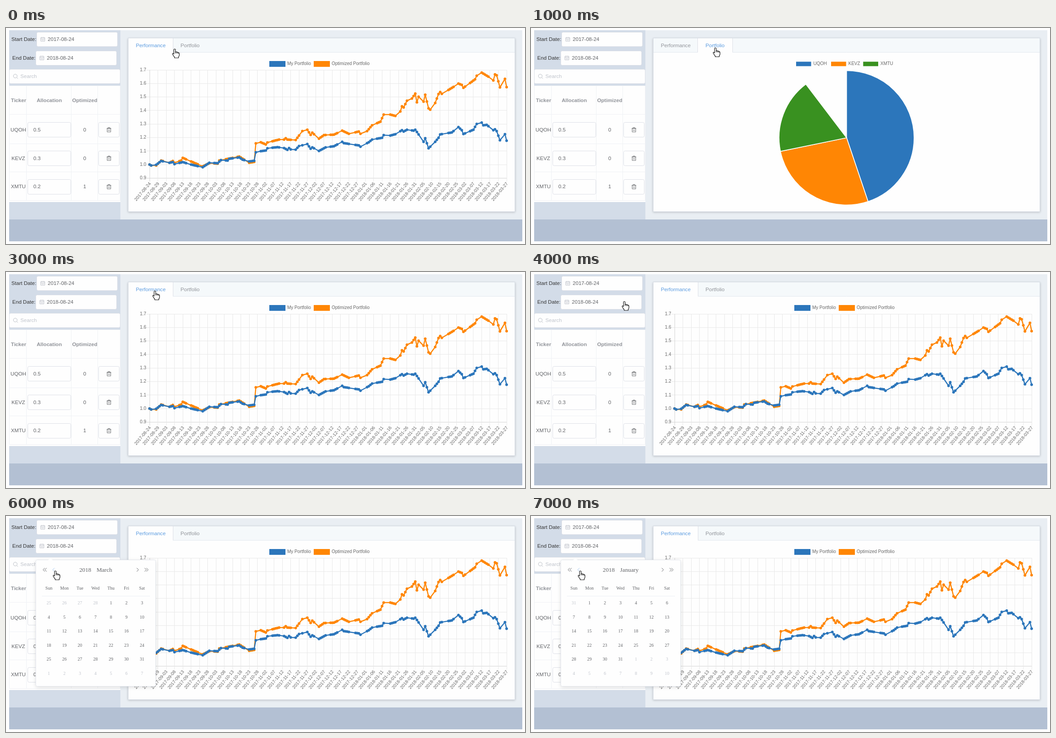
Write an HTML page with a canvas that moves like this. It is 1157x484 px and loops after 8000 ms.

```html
<!DOCTYPE html>
<html lang="en">
<head>
<meta charset="utf-8">
<title>Portfolio dashboard</title>
<style>
  html, body { margin: 0; width: 100%; height: 100%; overflow: hidden; background: #fefefe; }
  canvas { display: block; width: 1157px; height: 484px; }
</style>
</head>
<body>
<canvas id="stage"></canvas>
<script>
const W = 1157, H = 484, STEP = 1000, LOOP = 8000, DAY = 864e5;
const SANS = '"Liberation Sans", Arial, sans-serif';
const SERIF = '"Liberation Serif", "Times New Roman", serif';
const BLUE = '#2c76bb', ORANGE = '#ff8604', GREEN = '#399120';
const WHITE = '#fefefe', INK = '#606266', PALE = '#c0c4cc', LINE = '#dcdfe6', ACTIVE = '#5a9be0';

const assets = [
  { ticker: 'UQOH', share: 0.5, best: 0, color: BLUE },
  { ticker: 'KEVZ', share: 0.3, best: 0, color: ORANGE },
  { ticker: 'XMTU', share: 0.2, best: 1, color: GREEN }
];

// Turning points of each curve: day, y
const optimized = [
  0, 306, 1, 308, 4, 308, 7, 297, 12, 302, 14, 298, 15, 302, 19, 297, 20, 291, 25, 299,
  32, 310, 36, 303, 41, 304, 42, 297, 54, 288, 60, 302, 63, 300, 64, 258.5, 67, 256,
  70, 261, 71, 256.5, 78, 250, 81, 250, 82, 247, 83, 250, 88, 251, 92, 231, 95, 228,
  97, 239.5, 98, 234.5, 102, 248, 105, 240, 111, 239, 116, 230, 120, 237, 126, 232,
  127, 237, 131, 231, 134, 218, 139, 210, 141, 194, 145, 194, 148, 197, 151, 187,
  152, 175.5, 153, 178, 155, 163, 158, 158, 160, 147, 161, 166.5, 162, 154, 165, 165,
  166, 149.5, 168, 180, 169, 183, 172, 168, 174, 148, 175, 143.5, 176, 147.5, 183, 132,
  186, 124.5, 188, 127.5, 189, 134, 196, 115, 197, 107, 200, 100, 204, 109, 207, 117.5,
  208, 104, 209, 106, 211, 133, 214, 114, 215, 132.5
];
const mine = [
  0, 306, 1, 308, 4, 306.5, 7, 298, 12, 302, 14, 300.5, 15, 305, 20, 300.5, 25, 306,
  32, 312, 36, 302, 41, 303, 43, 296, 47, 297, 48, 293, 54, 290, 56, 295, 60, 299,
  63, 297.5, 64, 278.5, 67, 276, 70, 274.5, 71, 269.5, 77, 267, 81, 269, 83, 273,
  84, 269, 85, 272, 88, 272.5, 90, 264.5, 95, 260, 97, 270.5, 98, 267.5, 102, 275.5,
  106, 267.5, 111, 265, 116, 255, 117, 258, 126, 263, 127, 266, 132, 256, 134, 250,
  140, 246, 141, 240, 145, 241, 148, 238, 152, 229, 153, 232, 155, 228, 159, 230,
  160, 228, 161, 233, 165, 255, 166, 247, 168, 269.5, 172, 255, 174, 246, 175, 238.5,
  182, 234, 186, 222, 188, 229, 189, 237.5, 195, 228, 197, 215, 200, 212, 201, 218,
  203, 217, 207, 229, 208, 227, 209, 231, 211, 251.5, 214, 238, 215, 252.5
];
const holidays = [11, 91, 123, 130, 144, 179];
const FIRST = Date.UTC(2017, 7, 24), LAST_DAY = 215;
const dayX = d => 320 + d * 796 / LAST_DAY;

// One scene per second; months count from 0
const scenes = [
  { view: 'line', hand: [376, 47] },
  { view: 'pie', hand: [411, 44.5], sweep: 0.897 },
  { view: 'pie', hand: [332, 42.5], sweep: 1, hover: true },
  { view: 'line', hand: [332, 42.5] },
  { view: 'line', hand: [208, 66] },
  { view: 'line', hand: [110, 123], month: 5 },
  { view: 'line', hand: [110, 123], month: 2 },
  { view: 'line', hand: [110, 123], month: 0 }
];

const canvas = document.getElementById('stage');
const ctx = canvas.getContext('2d');
const ratio = window.devicePixelRatio || 1;
canvas.width = W * ratio;
canvas.height = H * ratio;

function rect(x, y, w, h, color) {
  ctx.fillStyle = color;
  ctx.fillRect(x, y, w, h);
}

function box(x, y, w, h, r = 3, border = LINE) {
  ctx.beginPath();
  ctx.roundRect(x + 0.5, y + 0.5, w - 1, h - 1, r);
  ctx.fillStyle = WHITE;
  ctx.fill();
  if (border) stroke(border);
}

function stroke(color, width = 1) {
  ctx.strokeStyle = color;
  ctx.lineWidth = width;
  ctx.stroke();
}

function path(points, color, width = 1) {
  ctx.beginPath();
  points.forEach(([x, y]) => ctx.lineTo(x, y));
  stroke(color, width);
}

function text(str, x, y, { color = INK, size = 11.6, align = 'left', font = SANS, bold = '' } = {}) {
  ctx.font = `${bold} ${size}px ${font}`;
  ctx.textAlign = align;
  ctx.textBaseline = 'middle';
  ctx.fillStyle = color;
  ctx.fillText(str, x, y + 0.5);
}

function shadow(blur, alpha, dy = 2) {
  ctx.shadowColor = `rgba(0,0,0,${alpha})`;
  ctx.shadowBlur = blur * ratio;
  ctx.shadowOffsetY = dy * ratio;
}

function clearShadow() {
  ctx.shadowColor = 'transparent';
}

function dateField(label, labelX, x, y, value) {
  const mid = y + 16;
  text(label, labelX, mid, { color: '#333' });
  box(x, y, 181, 33);
  ctx.beginPath();
  ctx.rect(x + 9.5, mid - 3.5, 9, 8);
  ctx.moveTo(x + 9.5, mid - 0.5);
  ctx.lineTo(x + 18.5, mid - 0.5);
  ctx.moveTo(x + 12, mid - 5);
  ctx.lineTo(x + 12, mid - 2.5);
  ctx.moveTo(x + 16, mid - 5);
  ctx.lineTo(x + 16, mid - 2.5);
  ctx.moveTo(x + 11.5, mid + 2);
  ctx.lineTo(x + 16.5, mid + 2);
  stroke('#b8bcc4', 0.9);
  text(value, x + 25, mid);
}

function trash(x, y) {
  ctx.beginPath();
  ctx.moveTo(x - 5, y - 3);
  ctx.lineTo(x + 5, y - 3);
  ctx.moveTo(x - 2, y - 3);
  ctx.lineTo(x - 2, y - 5);
  ctx.lineTo(x + 2, y - 5);
  ctx.lineTo(x + 2, y - 3);
  ctx.rect(x - 4, y - 3, 8, 8);
  ctx.moveTo(x - 1.3, y - 0.5);
  ctx.lineTo(x - 1.3, y + 3);
  ctx.moveTo(x + 1.3, y - 0.5);
  ctx.lineTo(x + 1.3, y + 3);
  stroke(INK, 0.9);
}

function sidebar() {
  rect(7, 5, 248, 424, '#d3dce8');
  dateField('Start Date:', 12, 68, 9, '2017-08-24');
  dateField('End Date:', 14, 66, 51, '2018-08-24');

  box(7, 92, 248, 33);
  ctx.beginPath();
  ctx.arc(20.7, 107.7, 4.2, 0, 7);
  ctx.moveTo(23.8, 110.8);
  ctx.lineTo(26.5, 113.5);
  stroke('#b8bcc4');
  text('Search', 32, 108, { color: PALE });

  rect(7, 129, 248, 261, WHITE);
  [7.5, 45.5, 145.5, 204.5, 254.5].forEach(x => path([[x, 129], [x, 387]], '#eff1f5'));
  [129.5, 193.5, 259.5, 322.5, 386.5].forEach(y => path([[7, y], [255, y]], '#eff1f5'));
  const head = { color: '#909399', align: 'center', bold: 'bold' };
  text('Ticker', 28, 162, head);
  text('Allocation', 96.5, 162, head);
  text('Optimized', 175.5, 162, head);
  assets.forEach((a, i) => {
    const y = 228 + i * 63.8;
    const top = Math.round(y - 17);
    text(a.ticker, 27.5, y, { align: 'center' });
    box(48, top, 97, 34);
    text(a.share, 61, y);
    text(a.best, 175.5, y, { align: 'center' });
    box(206, top, 47, 34);
    trash(229.5, y);
  });
}

function card({ view, hover }) {
  shadow(5, 0.2);
  rect(272, 22, 863, 389, WHITE);
  clearShadow();
  rect(272, 22, 863, 32, '#f5f9fb');
  path([[272, 54.5], [1135, 54.5]], '#e2e7ee');
  const line = view === 'line';
  const [x, w] = line ? [273, 99] : [372, 77];
  rect(x, 22, w, 33, WHITE);
  path([[x + w + 0.5, 22], [x + w + 0.5, 54]], LINE);
  if (!line) path([[x - 0.5, 22], [x - 0.5, 54]], LINE);
  ctx.strokeStyle = '#d4dae3';
  ctx.strokeRect(272.5, 22.5, 862, 389);
  text('Performance', 289.5, 39, { color: line || hover ? ACTIVE : '#909399' });
  text('Portfolio', 389, 39, { color: line ? '#909399' : ACTIVE });
}

function key(x, w, color, label, gap) {
  rect(x, line74(w), w, w > 34 ? 13 : 10, color);
  text(label, x + w + gap, 80, { size: 10, color: '#666' });
}

function line74(w) {
  return w > 34 ? 74 : 75.5;
}

// Height on a curve by linear interpolation between turning points
function heightAt(curve, day) {
  let i = 2;
  while (curve[i] < day) i += 2;
  const [d0, y0, d1, y1] = curve.slice(i - 2, i + 2);
  return y0 + (y1 - y0) * (day - d0) / (d1 - d0);
}

function tradingDays() {
  const days = [];
  for (let d = 0; d <= LAST_DAY; d++) {
    const weekend = d % 7 === 2 || d % 7 === 3;
    if (!weekend && !holidays.includes(d)) days.push(d);
  }
  return days;
}
const days = tradingDays();

function plot(curve, color) {
  const points = days.map(d => [dayX(d), heightAt(curve, d)]);
  ctx.lineJoin = 'round';
  path(points, color, 2.5);
  ctx.lineJoin = 'miter';
  ctx.fillStyle = color;
  points.forEach(([x, y]) => {
    ctx.beginPath();
    ctx.arc(x, y, 3, 0, 7);
    ctx.fill();
  });
}

function lineChart() {
  key(587, 36, BLUE, 'My Portfolio', 4);
  key(686, 36, ORANGE, 'Optimized Portfolio', 4);
  for (let i = 0; i <= 8; i++) {
    const y = 94 + i * 30.3;
    const snap = Math.floor(y) + 0.5;
    path([[313, snap], [1116, snap]], i === 8 ? '#d2d2d2' : '#e8e8e8');
    text((1.7 - i / 10).toFixed(1), 312.5, y - 0.5, { size: 10, align: 'right', color: '#666' });
  }
  for (let d = 0; d <= LAST_DAY; d += 5) {
    const x = dayX(d);
    const snap = Math.floor(x) + 0.5;
    path([[snap, 94], [snap, 344]], d ? '#e8e8e8' : '#d2d2d2');
    ctx.save();
    ctx.translate(x + 1, 347);
    ctx.rotate(-50 * Math.PI / 180);
    text(new Date(FIRST + d * DAY).toISOString().slice(0, 10), 0, 0, { size: 10, align: 'right', color: '#666' });
    ctx.restore();
  }
  plot(optimized, ORANGE);
  plot(mine, BLUE);
}

function pieChart(sweep) {
  const cx = 703.5, cy = 246, r = 150.5;
  let from = -Math.PI / 2;
  assets.forEach((a, i) => {
    const to = from + a.share * sweep * Math.PI * 2;
    ctx.beginPath();
    ctx.moveTo(cx, cy);
    ctx.arc(cx, cy, r, from, to);
    ctx.closePath();
    ctx.fillStyle = a.color;
    ctx.fill();
    stroke(WHITE, 1.7);
    from = to;
    key([591, 669, 740.5][i], 33.5, a.color, a.ticker, 5);
  });
}

function chevron(x, y, dir, color = INK) {
  path([[x + dir * 2, y - 4], [x - dir * 2, y], [x + dir * 2, y + 4]], color);
}

function calendar(month) {
  shadow(9, 0.14);
  box(66, 98, 268, 284, 3, null);
  clearShadow();
  box(66, 98, 268, 284, 3, '#e4e7ed');
  ctx.beginPath();
  ctx.moveTo(94, 99);
  ctx.lineTo(99, 94);
  ctx.lineTo(104, 99);
  ctx.fillStyle = WHITE;
  ctx.fill();

  const first = Date.UTC(2018, month, 1);
  const name = new Date(first).toLocaleString('en-US', { month: 'long', timeZone: 'UTC' });
  const title = { size: 13.3, font: SERIF };
  ctx.font = `13.3px ${SERIF}`;
  const left = 200 - (38.5 + ctx.measureText(name).width) / 2;
  text('2018', left, 121, title);
  text(name, left + 38.5, 121, title);
  [84.5, 88.5].forEach(x => chevron(x, 120.5, 1));
  chevron(106, 120.5, 1, '#9cc3ee');
  chevron(293.5, 120.5, -1);
  [311, 315].forEach(x => chevron(x, 120.5, -1));

  const cell = { size: 10, font: SERIF, align: 'center' };
  const colX = c => 95.6 + c * 34.6;
  ['Sun', 'Mon', 'Tue', 'Wed', 'Thu', 'Fri', 'Sat'].forEach((d, c) => text(d, colX(c), 162, cell));
  path([[80, 179.5], [321, 179.5]], '#ebeef5');
  const start = first - new Date(first).getUTCDay() * DAY;
  for (let i = 0; i < 42; i++) {
    const date = new Date(start + i * DAY);
    const color = date.getUTCMonth() === month ? INK : PALE;
    text(date.getUTCDate(), colX(i % 7), 195 + Math.floor(i / 7) * 31.5, { ...cell, color });
  }
}

function hand([x, y]) {
  ctx.save();
  ctx.translate(x, y);
  const shape = new Path2D('M-1.8 1.5Q-1.8 0 0 0Q1.8 0 1.8 1.5V7Q2.5 6 4 6.4Q5 6.7 5 7.6' +
    'Q6 6.8 7.2 7.4Q8 7.8 8 8.6Q10.3 8 10.3 10V14Q10.3 16 8.6 17.5V20H-.4V18' +
    'Q-2.8 15.5-4.6 12Q-5.4 10.3-4 9.8Q-2.8 9.6-1.8 11.5Z');
  ctx.fillStyle = WHITE;
  ctx.fill(shape);
  ctx.lineJoin = 'round';
  ctx.strokeStyle = '#111';
  ctx.lineWidth = 1.2;
  ctx.stroke(shape);
  ctx.stroke(new Path2D('M1.8 7V10M5 7.6V10.3M8 8.6V10.6'));
  ctx.restore();
}

function draw(scene) {
  ctx.setTransform(ratio, 0, 0, ratio, 0, 0);
  rect(0, 0, W, H, WHITE);
  rect(255, 5, 896, 424, '#e9eef3');
  rect(7, 429, 1144, 49, '#b3c0d3');
  sidebar();
  card(scene);
  if (scene.view === 'line') lineChart();
  else pieChart(scene.sweep);
  if (scene.month !== undefined) calendar(scene.month);
  hand(scene.hand);
}

const begin = performance.now();
function tick() {
  const t = (performance.now() - begin) % LOOP;
  draw(scenes[Math.floor(t / STEP)]);
  requestAnimationFrame(tick);
}
tick();
</script>
</body>
</html>
```
